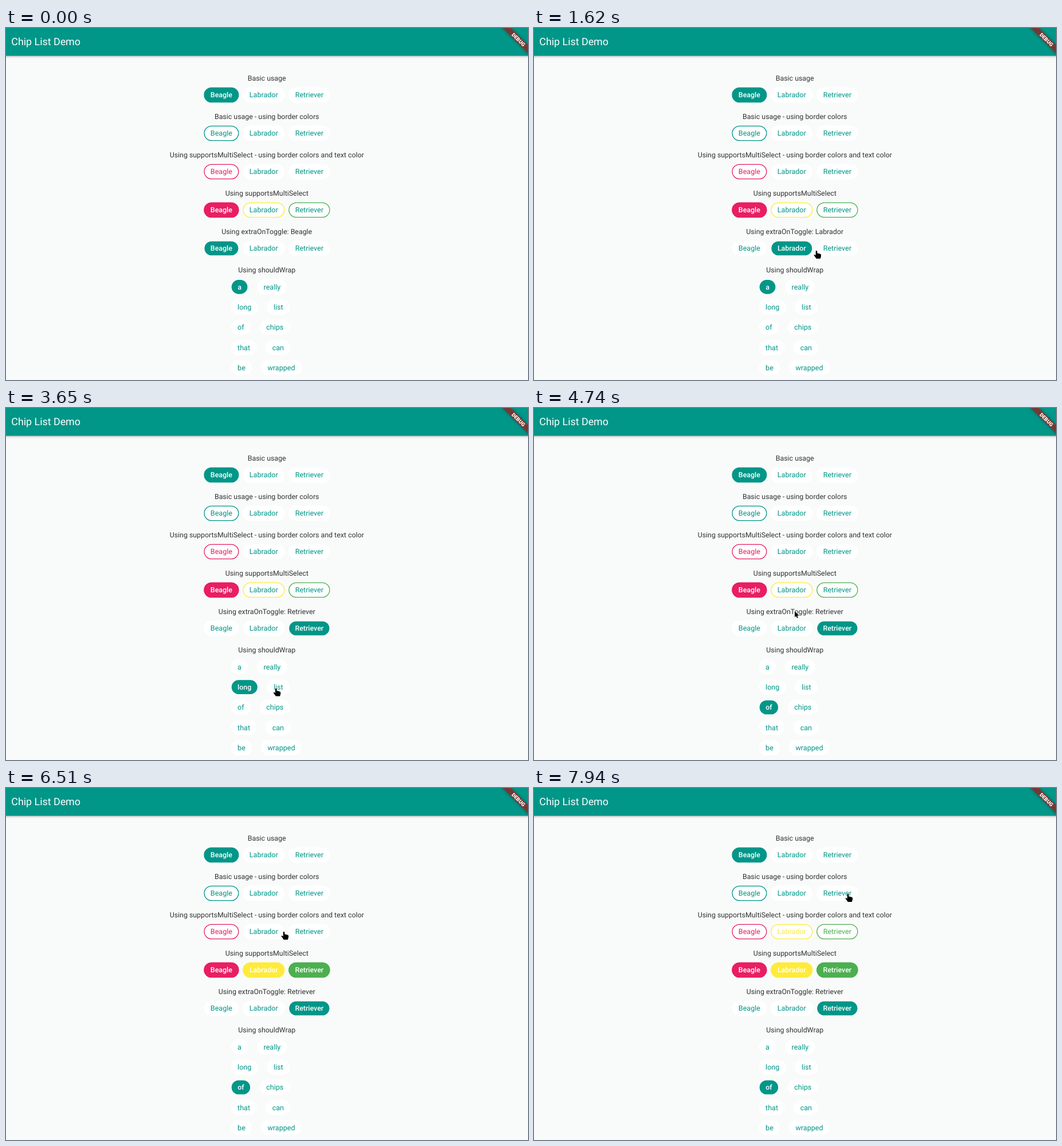
An HTML page that plays this animation: 911x615 px, repeating every 8000 ms.

```html
<!DOCTYPE html>
<html lang="en">
<head>
<meta charset="utf-8">
<title>Chip List Demo</title>
<style>
  html, body { margin: 0; width: 100%; height: 100%; overflow: hidden; background: #f9fbfa; }
  svg { display: block; width: 911px; height: 615px; }
  text { font: 400 12.38px Roboto, sans-serif; text-rendering: geometricPrecision; }
  .label { fill: #333; text-anchor: middle; }
  .chip text { font-size: 12.55px; text-anchor: middle; }
  .chip.filled text { font-weight: 500; font-size: 12.42px; }
  .title { font-size: 17.85px; fill: #fff; }
  .ribbon rect { fill: #b71c1c; fill-opacity: .63; filter: drop-shadow(0 0 2.5px rgba(0, 0, 0, .5)); }
  .ribbon text { font-weight: 900; font-size: 9.05px; fill: #fff; text-anchor: middle; }
  .pointer { stroke: #fff; stroke-width: .6; stroke-opacity: .6; paint-order: stroke; }
</style>
</head>
<body>
<svg viewBox="0 0 911 615">
  <defs>
    <linearGradient id="shade" x2="0" y2="1">
      <stop offset="0" stop-opacity=".24"/>
      <stop offset=".4" stop-opacity=".08"/>
      <stop offset="1" stop-opacity="0"/>
    </linearGradient>
  </defs>
  <rect y="48.7" width="911" height="5" fill="url(#shade)"/>
  <rect width="911" height="48.7" fill="#009688"/>
  <text class="title" x="9.3" y="30.2">Chip List Demo</text>
  <g class="ribbon" transform="translate(915.7 -1) rotate(45)">
    <rect x="-35.5" y="24.8" width="71" height="10.7"/>
    <text y="33.4">DEBUG</text>
  </g>
  <g id="list"></g>
  <g id="cursor">
    <path id="arrow" class="pointer" d="M0 0V10.6L2.4 8.4 4 12 5.8 11.2 4.2 7.7H7.6Z"/>
    <path id="hand" class="pointer" transform="scale(.93)" d="M-1.4 1Q0-1 1.4 1V5.2Q3 4.2 4.2 5.6 5.6 4.8 6.5 6.2 8.6 5.8 8.6 8V10.5Q8 12.5 7.3 15H-.4Q-2 12-4.6 9.2-5.4 7.4-3.4 7.4L-1.4 9Z"/>
    <circle id="press" r="11.3" fill="#fff000" opacity=".62"/>
  </g>
</svg>
<script>
const LOOP = 8000, FADE = 130, DELAY = 40, PRESS = 120;
const SETTLE = 120, LINGER = 50, ENTER = 190;
const CENTER = 455.4, PITCH = 67, PAD = 11.5, BORDER = 1.3, HEIGHT = 26.6;
const TEAL = '#009688', PINK = '#e91e63', YELLOW = '#ffeb3b', GREEN = '#4caf50', WHITE = '#fff';
const $ = id => document.getElementById(id);
const list = $('list');

function add(parent, tag, attrs, text) {
  const el = document.createElementNS('http://www.w3.org/2000/svg', tag);
  for (const key in attrs) el.setAttribute(key, attrs[key]);
  if (text) el.textContent = text;
  parent.append(el);
  return el;
}

// One look of a chip: pill plus caption
function face(chip, { fill = WHITE, border = fill, ink = TEAL, trim = 0 }) {
  const g = add(list, 'g', { class: ink === WHITE ? 'chip filled' : 'chip' });
  const inset = trim + BORDER / 2, w = chip.width - 2 * inset, h = HEIGHT - 2 * inset;
  add(g, 'rect', {
    x: chip.x - w / 2, y: chip.y - h / 2, width: w, height: h, rx: h / 2,
    fill, stroke: border, 'stroke-width': BORDER
  });
  add(g, 'text', { x: chip.x, y: chip.y + 4.3, fill: ink }, chip.name);
  return g;
}

function chipWidth(name) {
  const g = add(list, 'g', { class: 'chip' });
  const width = add(g, 'text', {}, name).getComputedTextLength() + 2 * PAD;
  g.remove();
  return width;
}

// Lays chips side by side, centred unless a left edge is given
function layRow(names, y, gap, looks, left) {
  const widths = names.map(chipWidth);
  const total = widths.reduce((a, b) => a + b) + gap * (names.length - 1);
  let x = left ?? CENTER - total / 2;
  return names.map((name, i) => {
    const chip = { name, y, width: widths[i], x: x + widths[i] / 2, from: Infinity, to: Infinity };
    x += widths[i] + gap;
    const [off, on] = looks(i);
    face(chip, off);
    chip.over = face(chip, on);
    return chip;
  });
}

const label = (row, text) =>
  add(list, 'text', { class: 'label', x: CENTER - .2, y: 92.1 + PITCH * row }, text);
const rowY = row => 117 + PITCH * row;

const breeds = ['Beagle', 'Labrador', 'Retriever'], hues = [PINK, YELLOW, GREEN];
const filled = (fill, trim) => ({ fill, ink: WHITE, trim });
const small = () => [{}, filled(TEAL, 1)];
const sections = [
  ['Basic usage', () => [{}, filled(TEAL)]],
  ['Basic usage - using border colors', () => [{}, { border: TEAL }]],
  ['Using supportsMultiSelect - using border colors and text color',
    i => [{}, { border: hues[i], ink: hues[i] }]],
  ['Using supportsMultiSelect', i => [{ border: hues[i] }, filled(hues[i])]],
  ['Using extraOnToggle: Beagle', small]
];
const multi = [sections[2], sections[3]].map(s => sections.indexOf(s));

const labels = sections.map(([text], row) => label(row, text));
const grid = sections.map(([, looks], row) => layRow(breeds, rowY(row), 6.9, looks));

label(5, 'Using shouldWrap');
const words = 'a really long list of chips that can be wrapped'.split(' ');
grid.push([0, 1, 2, 3, 4].flatMap(i =>
  layRow(words.slice(2 * i, 2 * i + 2), rowY(5) + .4 + 35.27 * i, 15.6, small, 392.6)));

const chips = grid.flat();
const active = grid.map(([first]) => first);
for (const chip of active) chip.from = -LOOP;

const rest = (t, x, y) => ({ t, x, y });

// A click selects its chip and, in single-choice rows, releases the last one
function click(t, row, i, dx = 0, dy = 0) {
  const chip = grid[row][i];
  chip.from = t;
  if (!multi.includes(row)) active[row].to = t;
  active[row] = chip;
  return { t, x: chip.x + dx, y: chip.y + dy, press: true, row, name: chip.name };
}

const tour = [
  rest(ENTER, 784, 592), rest(1000, 434, 341),
  click(1290, 4, 1), rest(1640, 493, 389), click(2070, 4, 2, 14),
  click(2890, 5, 1, 1, -7), click(3270, 5, 2), click(3720, 5, 3, -4, 2),
  click(4060, 5, 5), click(4540, 5, 4), rest(4760, 455, 355),
  click(5080, 3, 1), click(5630, 3, 2), rest(6180, 490, 235), rest(6510, 485, 251),
  click(6800, 2, 1), click(7260, 2, 2),
  rest(7810, 572, 194), rest(LOOP, 548, 185)
];
const clicks = tour.filter(s => s.press);
const toggles = clicks.filter(s => s.row === 4);

const clamp = v => Math.min(1, Math.max(0, v));
const fade = (t, start) => clamp((t - start - DELAY) / FADE);
const show = (el, on) => el.setAttribute('visibility', on ? 'visible' : 'hidden');

// Glides from stop to stop, coming to rest shortly before each one is due
function pointerAt(t) {
  const i = Math.max(1, tour.findIndex(s => s.t > t)), a = tour[i - 1], b = tour[i];
  const k = clamp((t - a.t - LINGER) / (b.t - a.t - LINGER - SETTLE));
  const e = k * k * (3 - 2 * k);
  return [a.x + (b.x - a.x) * e, a.y + (b.y - a.y) * e];
}

function render(t) {
  for (const c of chips) c.over.setAttribute('opacity', fade(t, c.from) - fade(t, c.to));
  const last = toggles.filter(s => t >= s.t + DELAY).pop();
  const text = 'Using extraOnToggle: ' + (last ? last.name : breeds[0]);
  if (labels[4].textContent !== text) labels[4].textContent = text;

  const [x, y] = pointerAt(t), visible = t >= ENTER;
  const over = chips.some(c => Math.abs(x - c.x) < c.width / 2 + 3 && Math.abs(y - c.y) < 15);
  $('cursor').setAttribute('transform', `translate(${x} ${y})`);
  show($('hand'), visible && over);
  show($('arrow'), visible && !over);
  show($('press'), clicks.some(s => t >= s.t && t < s.t + PRESS));
}

let start;
function tick(now) {
  start ??= now;
  render((now - start) % LOOP);
  requestAnimationFrame(tick);
}
render(0);
requestAnimationFrame(tick);
</script>
</body>
</html>
```
